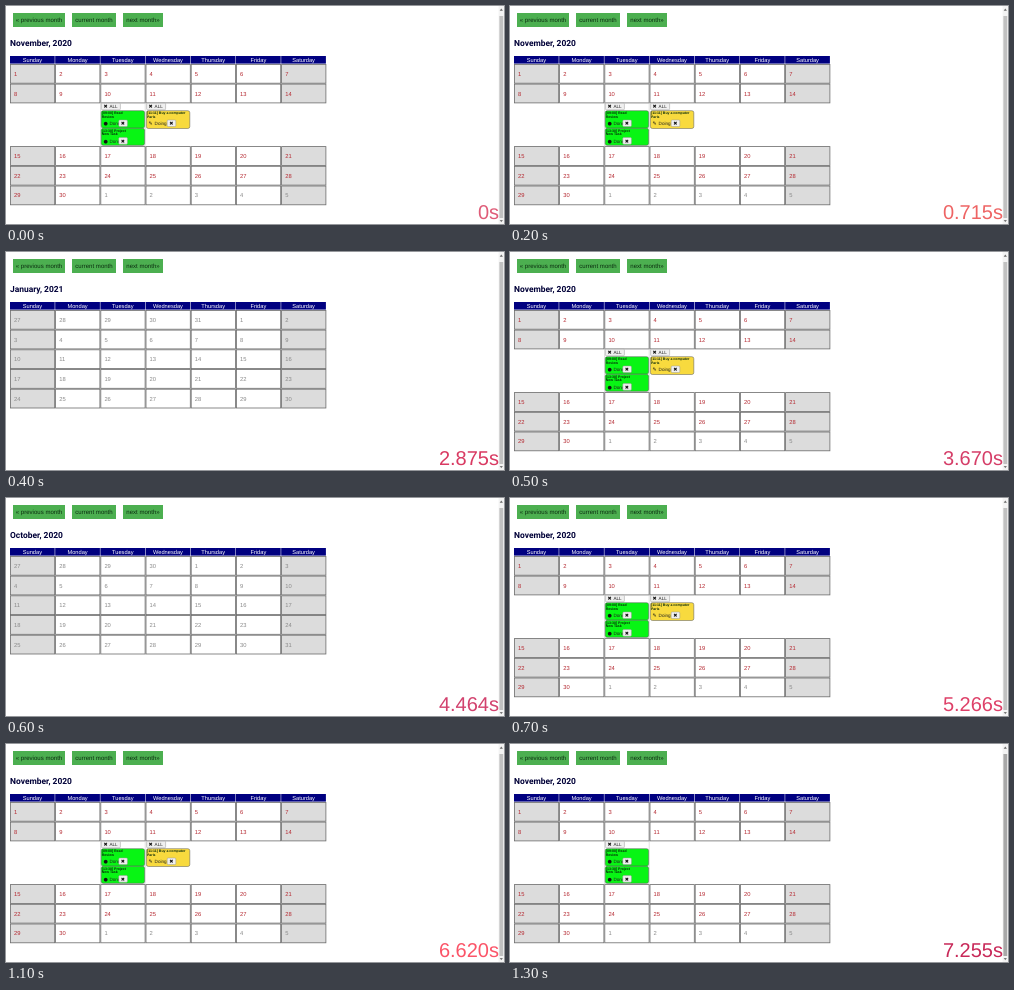
An HTML page for the animation above (1400 ms loop, 498 px wide and 218 px high).

```html
<!DOCTYPE html>
<html lang="en">
<head>
<meta charset="utf-8">
<title>Calendar</title>
<style>
  html, body { margin: 0; width: 100%; height: 100%; overflow: hidden; background: #fff; }
  svg { display: block; width: 498px; height: 218px; }
  text { font-family: "Liberation Sans", Arial, sans-serif; text-rendering: geometricPrecision; }
  .title { font: bold 8.45px Roboto, sans-serif; fill: #000038; }
  .nav { font-size: 6.05px; fill: #0b2c10; text-anchor: middle; }
  .head { font-size: 5.7px; fill: #fff; text-anchor: middle; }
  .day { font-size: 5.8px; }
  .note { font-size: 3.5px; font-weight: bold; fill: #06280a; }
  .small { font-size: 4.6px; fill: #222; }
  .icon { font-family: "DejaVu Sans", sans-serif; font-size: 5px; fill: #111; }
  #clock { font-size: 20px; text-anchor: end; }
</style>
</head>
<body>
<svg id="stage" viewBox="0 0 498 218"></svg>
<script>
const NS = 'http://www.w3.org/2000/svg';
const stage = document.getElementById('stage');
const LEFT = 4, COL = 45.2, ROW = 19.7, TOP = 58;
const WEEK = ['Sunday', 'Monday', 'Tuesday', 'Wednesday', 'Thursday', 'Friday', 'Saturday'];

function add(parent, tag, attrs = {}, content) {
  const el = document.createElementNS(NS, tag);
  for (const key in attrs) el.setAttribute(key, attrs[key]);
  if (content !== undefined) el.textContent = content;
  parent.appendChild(el);
  return el;
}
const box = (p, x, y, width, height, fill, more) =>
  add(p, 'rect', { x, y, width, height, fill, ...more });
const label = (p, x, y, cls, str, more) =>
  add(p, 'text', { x, y, class: cls, ...more }, str);

function navButton(x, width, str) {
  box(stage, x, 7, width, 14, '#4caf50');
  label(stage, x + width / 2, 16.2, 'nav', str);
}

function smallButton(p, x, y, width, icon, str) {
  box(p, x, y, width, 6.6, '#f0f0f0', { rx: 1, stroke: '#999', 'stroke-width': .5 });
  label(p, x + 2, y + 5, 'icon', icon);
  if (str) label(p, x + 8, y + 5, 'small', str);
}

function eventCard(p, x, y, height, fill, lines, icon, action, closeX) {
  box(p, x, y, 43.4, height, fill, { rx: 2, stroke: '#555', 'stroke-width': .5 });
  lines.forEach((str, i) => label(p, x + .6, y + 3.3 + i * 3.7, 'note', str));
  label(p, x + 2.2, y + 14.4, 'icon', icon);
  label(p, x + 8.2, y + 14.4, 'small', action);
  smallButton(p, x + closeX, y + 9.3, 8.6, '✖');
}

// first: date of the top left cell, length: days in the month it belongs to
function month(title, first, length, next, active) {
  const g = add(stage, 'g');
  label(g, 4, 39.8, 'title', title);
  for (let i = 0; i < 35; i++) {
    const col = i % 7, row = Math.floor(i / 7);
    const x = LEFT + col * COL;
    const y = TOP + row * ROW + (active && row > 1 ? 42.8 : 0);
    let day = first + i, spill = false;
    if (day > length) { day -= length; spill = true; }
    if (next && spill && day > next) day -= next;
    box(g, x + .4, y + .4, COL - .9, ROW - .9, col % 6 ? '#fff' : '#dcdcdc',
      { stroke: '#6c6c6c', 'stroke-width': .8 });
    label(g, x + 4, y + 11.8, 'day', day, { fill: active && !spill ? '#b52a32' : '#8a8a8a' });
  }
  return g;
}

box(stage, 0, 0, 498, 218, '#fff');
navButton(7, 52, '« previous month');
navButton(66, 44, 'current month');
navButton(117, 40, 'next month»');
WEEK.forEach((name, i) => {
  const x = LEFT + i * COL;
  box(stage, x, 50, COL - .5, 7.6, '#000080');
  label(stage, x + COL / 2 - .2, 55.8, 'head', name);
});

const views = {
  oct: month('October, 2020', 27, 30, 31),
  nov: month('November, 2020', 1, 30, 0, true),
  dec: month('December, 2020', 29, 30, 31),
  jan: month('January, 2021', 27, 31, 31)
};

const GREEN = '#08f514';
box(views.nov, 94.7, 97, 44.4, 42.6, 'none', { stroke: '#c4c4c4', 'stroke-width': .5 });
smallButton(views.nov, 95.4, 97.2, 19, '✖', 'ALL');
eventCard(views.nov, 95.2, 104.7, 17.4, GREEN, ['[09:00] Read', 'Review'], '●', 'Done', 17.6);
eventCard(views.nov, 95.2, 122.3, 17, GREEN, ['[13:30] Project', 'New Task'], '●', 'Done', 17.6);

const wednesday = add(views.nov, 'g');
smallButton(wednesday, 140.6, 97.2, 19, '✖', 'ALL');
eventCard(wednesday, 140.4, 104.7, 17.8, '#f8da3e', ['[11:11] Buy a computer', 'Paris'], '✎', 'Doing', 20.8);

box(stage, 492.6, 0, 5.4, 218, '#f3f3f3');
const thumb = box(stage, 493.4, 10, 3.8, 202, '#c1c1c1');
add(stage, 'path', { d: 'M493.7 4.8 L495.3 2.6 L496.9 4.8 Z', fill: '#666' });
add(stage, 'path', { d: 'M493.7 214 L495.3 216.2 L496.9 214 Z', fill: '#777' });
const clock = label(stage, 493, 213, '', '0s', { id: 'clock' });

// one step each 100 ms: view, clock, clock colour
const steps = [
  ['nov', '0s', '#df5c78'],
  ['nov', '0.352s', '#e65f70'],
  ['nov', '0.715s', '#ee6464'],
  ['dec', '1.795s', '#e34c62'],
  ['jan', '2.875s', '#d93a62'],
  ['nov', '3.670s', '#d53e68'],
  ['oct', '4.464s', '#d2426e'],
  ['nov', '5.266s', '#de4068'],
  ['nov', '5.667s', '#e64066'],
  ['nov', '6.068s', '#ee4264'],
  ['nov', '6.344s', '#f54a65'],
  ['nov', '6.620s', '#fb5468'],
  ['nov', '6.938s', '#e23e60'],
  ['nov', '7.255s', '#c82858']
];

let shown = -1;
function draw(time) {
  const n = Math.floor((time % 1400) / 100);
  if (n !== shown) {
    shown = n;
    const [view, str, colour] = steps[n];
    for (const key in views) views[key].style.display = key === view ? '' : 'none';
    wednesday.style.display = n === 13 ? 'none' : '';
    thumb.setAttribute('fill', n === 13 ? '#a8a8a8' : '#c1c1c1');
    clock.textContent = str;
    clock.setAttribute('fill', colour);
  }
}

const start = performance.now();
function tick() {
  draw(performance.now() - start);
  requestAnimationFrame(tick);
}
tick();
</script>
</body>
</html>
```
